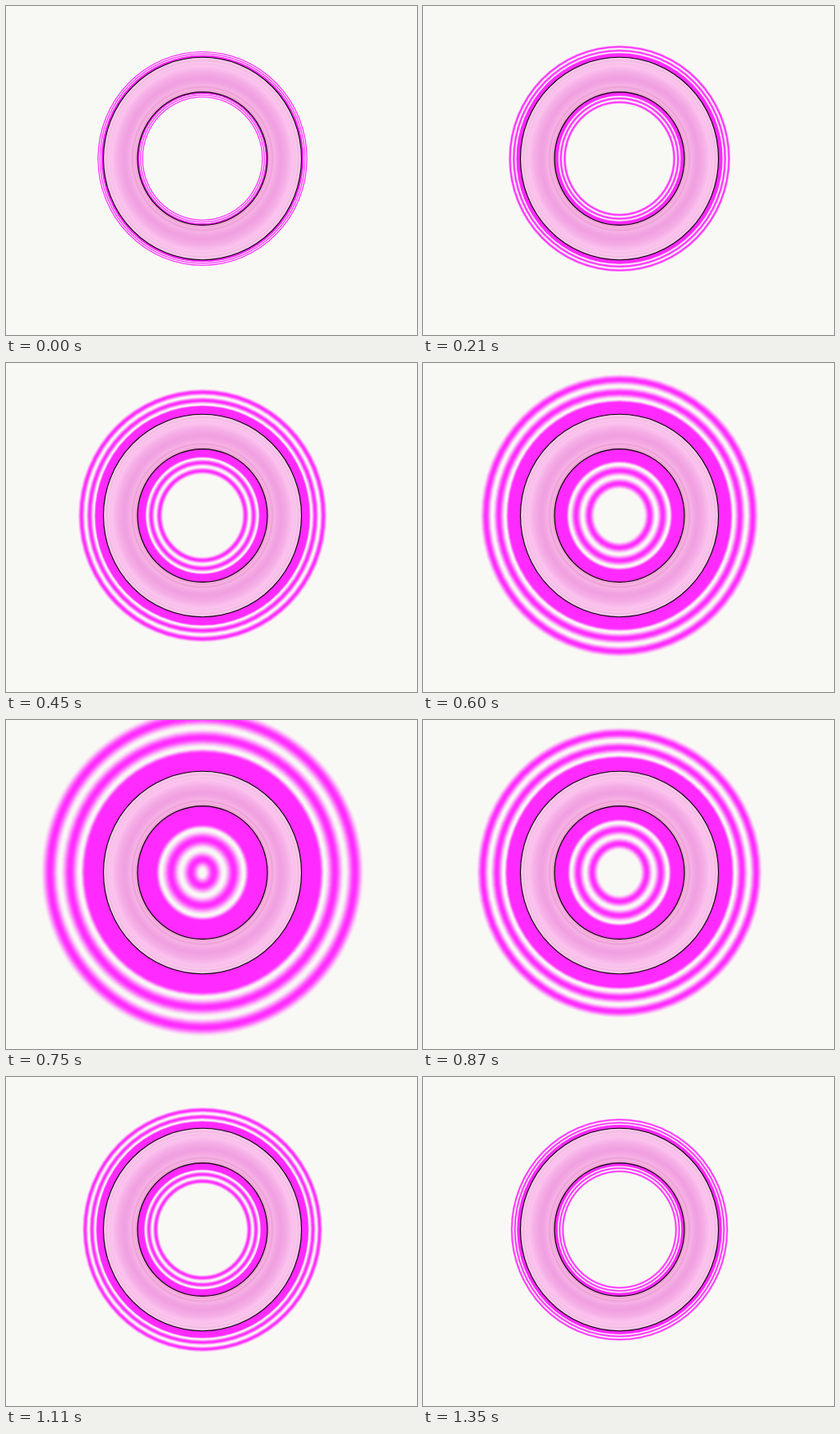
Recreate the animation shown at these times as an HTML page with a canvas. Size 500x400 px, loop 1.45 s.

```html
<!DOCTYPE html>
<html lang="en">
<head>
<meta charset="utf-8">
<title>Pulsing ring</title>
<style>
html, body { margin: 0; width: 100%; height: 100%; overflow: hidden; background: #f8f9f4; }
canvas { display: block; }
</style>
</head>
<body>
<canvas id="stage" width="500" height="400"></canvas>
<script>
const ctx = document.getElementById('stage').getContext('2d');
const CX = 239, CY = 185.5;
const OUTER = [120.5, 123.2], INNER = [79, 80.9];
const BG = [248, 249, 244], GLOW = [255, 43, 255];
const LOOP = 1450, STEP = 30, LAST = 45, PEAK = 25, BANDS = 120;

const mix = a => `rgb(${BG.map((c, i) => Math.round(c + (GLOW[i] - c) * a))})`;

// Glow strength at x, from 0 at the ring edge to 1 where it ends
function strength(x) {
  const solid = 0.28, gap = 0.37, period = 0.315;
  if (x < solid) return 1;
  if (x < gap) return 0.5 + 0.5 * Math.cos(Math.PI * (x - solid) / (gap - solid));
  return 0.5 - 0.5 * Math.cos(2 * Math.PI * (x - gap) / period);
}

function oval([rx, ry], offset = 0) {
  ctx.beginPath();
  ctx.ellipse(CX, CY, Math.max(0, rx + offset), Math.max(0, ry + offset), 0, 0, 2 * Math.PI);
}

function fillOval(size, offset, style) {
  oval(size, offset);
  ctx.fillStyle = style;
  ctx.fill();
}

const scaleY = OUTER[1] / OUTER[0];
const shade = ctx.createRadialGradient(0, 0, OUTER[0], 0, 0, INNER[0]);
[
  [0, '#efb8dc'], [0.05, '#fbc9ec'], [0.1, '#f3b9e2'], [0.14, '#fcc8ee'],
  [0.18, '#f7bfe9'], [0.25, '#fbc3ee'], [0.42, '#f5ade6'], [0.6, '#f09fe0'],
  [0.7, '#f2a5e2'], [0.8, '#f6b2e6'], [0.86, '#eda0d6'], [0.9, '#f7b4e4'],
  [0.95, '#efa6d6'], [1, '#e89cc8']
].forEach(([at, color]) => shade.addColorStop(at, color));

function drawRing() {
  ctx.save();
  ctx.translate(CX, CY);
  ctx.scale(1, scaleY);
  ctx.fillStyle = shade;
  ctx.beginPath();
  ctx.arc(0, 0, OUTER[0], 0, 2 * Math.PI);
  ctx.fill();
  ctx.restore();
}

function outline(size) {
  oval(size);
  ctx.lineWidth = 1.15;
  ctx.strokeStyle = '#0c000c';
  ctx.stroke();
}

function draw(reach) {
  ctx.fillStyle = mix(0);
  ctx.fillRect(0, 0, 500, 400);

  for (let i = BANDS; i > 0; i--) {
    fillOval(OUTER, reach * i / BANDS, mix(strength((i - 0.5) / BANDS)));
  }
  drawRing();
  for (let i = 0; i <= BANDS; i++) {
    const d = reach * i / BANDS;
    if (d >= INNER[0]) break;
    fillOval(INNER, -d, mix(i < BANDS ? strength((i + 0.5) / BANDS) : 0));
  }
  outline(OUTER);
  outline(INNER);
}

// Near-exponential growth, mirrored after the peak
function reachAt(ms) {
  const n = Math.min(LAST, Math.floor(ms / STEP));
  const k = n <= PEAK ? n : 2 * PEAK - n;
  return 7.5 * Math.exp(0.1 * k - 0.00027 * k * k);
}

const start = performance.now();
function tick() {
  draw(reachAt((performance.now() - start) % LOOP));
  requestAnimationFrame(tick);
}
tick();
</script>
</body>
</html>
```
